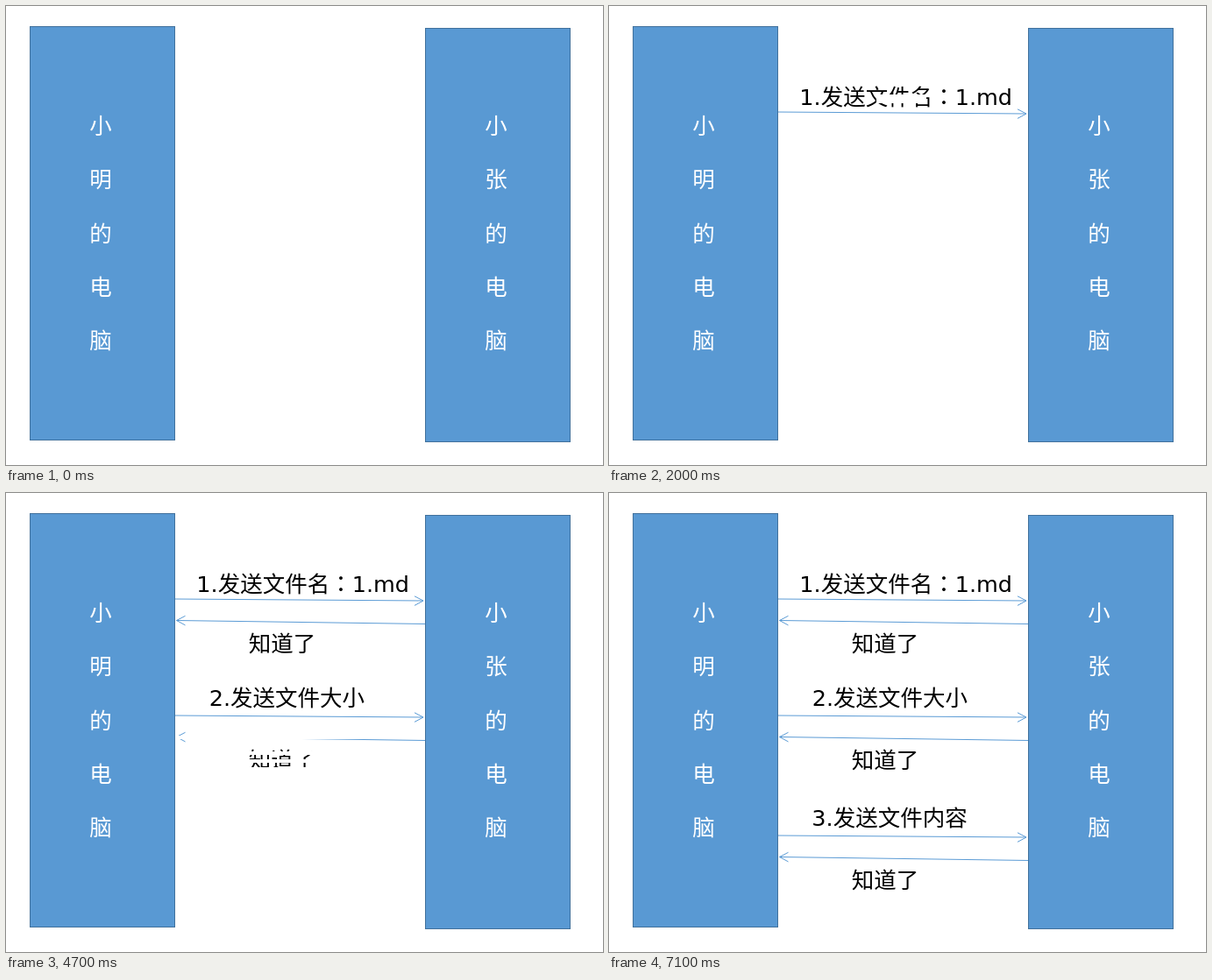
Recreate the animation shown at these times as an HTML page. Size 681 by 524 pixels, loop 7.9 s.

```html
<!DOCTYPE html>
<html lang="zh">
<head>
<meta charset="utf-8">
<title>文件传输</title>
<style>
  html, body { margin: 0; width: 100%; height: 100%; overflow: hidden; background: #fff; }
  svg { display: block; width: 681px; height: 524px; }
  text {
    font: 25.5px "DejaVu Sans", "Noto Sans CJK JP", "Noto Sans CJK SC", sans-serif;
    text-anchor: middle;
  }
  .arrow { fill: none; stroke: #5b9bd5; stroke-width: 1; }
  .cover { fill: #fff; shape-rendering: crispEdges; }
  .host rect { fill: #5999d3; stroke: #41719c; }
  .host text { fill: #fff; }
</style>
</head>
<body>
<svg id="stage" viewBox="0 0 681 524"></svg>
<script>
const LOOP = 7900, TICK = 100, SLATS = 6;
const stage = document.getElementById('stage');

function add(parent, tag, attrs, text = '') {
  const el = document.createElementNS('http://www.w3.org/2000/svg', tag);
  for (const k in attrs) el.setAttribute(k, attrs[k]);
  el.textContent = text;
  parent.appendChild(el);
  return el;
}

// Line from one point to another; dir is 1 when the head points right.
function arrow(x0, y0, x1, y1, dir) {
  const back = x1 - 10 * dir;
  add(stage, 'path', {
    class: 'arrow',
    d: `M${x0} ${y0}L${x1} ${y1}M${back} ${y1 - 5.2}L${x1} ${y1}L${back} ${y1 + 5.4}`
  });
}

// The wide colon sits centred in its cell, as in Japanese setting.
function label(x, y, text) {
  const [head, tail] = text.split('：');
  const el = add(stage, 'text', { x, y }, head);
  if (tail) {
    add(el, 'tspan', { lang: 'ja' }, '：');
    add(el, 'tspan', {}, tail);
  }
}

function host(x, y, name) {
  const g = add(stage, 'g', { class: 'host' });
  add(g, 'rect', { x, y, width: 165, height: 472 });
  [...name].forEach((c, i) => add(g, 'text', { x: x + 80.5, y: 146 + i * 61.3 }, c));
}

const cover = () => add(stage, 'rect', { class: 'cover' });

function place(el, x, y, width, height) {
  const box = { x, y, width, height };
  for (const k in box) el.setAttribute(k, box[k]);
}

// Reveals from the outer edges towards the centre.
function boxIn(cx, cy, w, h) {
  const el = cover();
  return p => {
    const s = 1 - p;
    place(el, cx - w * s, cy - h * s, 2 * w * s, 2 * h * s);
  };
}

// Horizontal slats, each uncovered from its top edge down.
function blinds(top, height) {
  const pitch = height / SLATS;
  const slats = Array.from({ length: SLATS }, cover);
  return p => {
    const open = p ** 1.2;
    slats.forEach((el, i) => place(el, 190, top + pitch * (i + open), 291, pitch * (1 - open)));
  };
}

const reveals = [];
const reveal = (at, take, show) => reveals.push({ at, take, show });

function send(y, text, textX, textY, at, take) {
  arrow(192, y, 476, y + 2, 1);
  label(textX, textY, text);
  reveal(at, take, reveals.length ? blinds(y - 39.8, 48.6) : boxIn(333.5, y - 15, 144, 23));
}

function reply(y, at, take) {
  arrow(479, y + 4, 194.5, y, -1);
  label(315, y + 35, '知道了');
  reveal(at, take, blinds(y - 6.1, 53.4));
}

send(121, '1.发送文件名：1.md', 338.7, 112.5, 500, 2000);
reply(145.5, 2100, 900);
send(254, '2.发送文件大小', 320.4, 243, 3500, 600);
reply(278.5, 4400, 700);
send(391, '3.发送文件内容', 320, 380, 5600, 500);
reply(415.5, 6400, 800);

host(27.5, 23.5, '小明的电脑');
host(478.5, 25.5, '小张的电脑');

// A reveal snaps to its end as soon as the next one begins.
function draw(t) {
  const now = Math.floor(t / TICK) * TICK;
  reveals.forEach(({ at, take, show }, i) => {
    const next = reveals[i + 1];
    const p = next && now >= next.at ? 1 : (now - at + TICK) / take;
    show(Math.min(1, Math.max(0, p)));
  });
}

let start;
function frame(now) {
  start ??= now;
  draw((now - start) % LOOP);
  requestAnimationFrame(frame);
}
draw(0);
requestAnimationFrame(frame);
</script>
</body>
</html>
```
